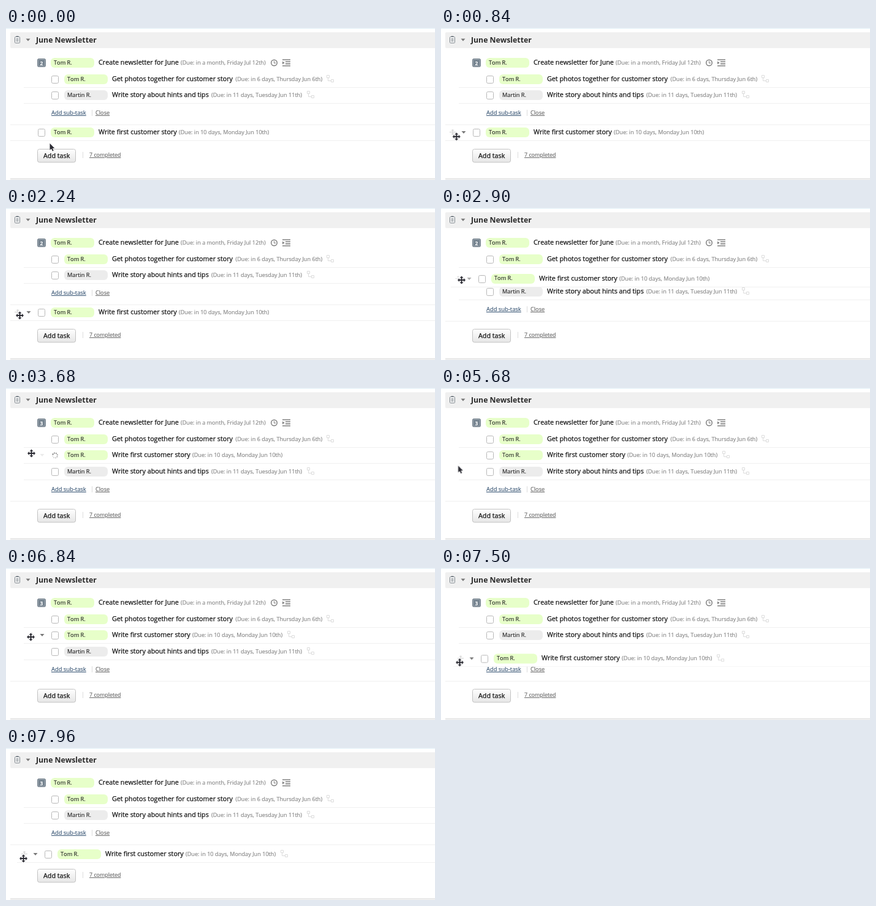
An HTML page for the animation above (8000 ms loop, 700 px wide and 249 px high).

```html
<!DOCTYPE html>
<html lang="en">
<head>
<meta charset="utf-8">
<title>Task list</title>
<style>
html, body { margin: 0; width: 100%; height: 100%; overflow: hidden; background: #fff; }
svg { display: block; width: 700px; height: 249px; font-family: "Open Sans", "Noto Sans", sans-serif; font-kerning: none; }

.title { font-size: 10.75px; fill: #111; stroke: #111; stroke-width: .25px; }
.due { font-size: 9.15px; fill: #8a8a8a; stroke: #8a8a8a; stroke-width: .2px; }
.name { font-size: 9.2px; fill: #222; stroke: #222; stroke-width: .15px; }
.head { font-size: 12.25px; font-weight: 700; fill: #2a2a2a; }
.link { font-size: 9.2px; fill: #666; stroke: #666; stroke-width: .15px; text-decoration: underline; }
.blue { font-size: 9.4px; fill: #3c5876; stroke: #3c5876; }
.count { font-size: 8.5px; font-weight: 700; fill: #fff; text-anchor: middle; }
.line { fill: #f0f0f0; }
.green { fill: #e7ffc9; }
.gray { fill: #ececec; }

/* Everything shares one 8 s clock. */
.anim { animation: 8s linear infinite; }
.step { animation: 8s step-end infinite; }
#cursor { animation-name: cursor; }
#task { animation-name: task; }
#arrow { animation-name: arrow; }
#move { animation-name: move; }
#second { animation-name: second; }
#links { animation-name: links; }
#hover { animation-name: hover; }
#box { animation-name: box; }
#spinner { animation-name: spinner; }
#tree { animation-name: tree; }
#two { animation-name: two; }
#three { animation-name: three; }
#dots { animation: spin .8s steps(12) infinite; }

@keyframes cursor {
  0% { transform: translate(71px, 188px); animation-timing-function: ease-in-out; }
  10.25% { transform: translate(25px, 178px); }
  13.25%, 28% { transform: translate(22px, 176px); animation-timing-function: ease-in; }
  32.25% { transform: translate(27px, 149px); }
  36.25% { transform: translate(33px, 118px); }
  37.75% { transform: translate(35px, 115px); animation-timing-function: ease-out; }
  42.75%, 50.5% { transform: translate(41px, 107px); animation-timing-function: ease-in; }
  56% { transform: translate(34px, 180px); }
  58% { transform: translate(17px, 211px); }
  59.25%, 62.5% { transform: translate(18px, 218px); animation-timing-function: ease-in-out; }
  72.5%, 76.25% { transform: translate(28px, 122px); animation-timing-function: ease-in-out; }
  82%, 83.75% { transform: translate(41px, 114px); }
  85.5%, 88% { transform: translate(40px, 113px); animation-timing-function: ease-in; }
  93% { transform: translate(31px, 147px); animation-timing-function: ease-out; }
  98% { transform: translate(27px, 179px); }
  99.5%, 100% { transform: translate(28px, 181px); }
}
@keyframes task {
  0%, 28% { transform: translate(0, 174px); animation-timing-function: ease-in; }
  32.25% { transform: translate(4px, 149px); }
  36.25% { transform: translate(9px, 119px); }
  37.75% { transform: translate(11px, 116px); animation-timing-function: ease-out; }
  42.75% { transform: translate(17px, 108px); animation-timing-function: step-end; }
  46%, 88% { transform: translate(22px, 113px); animation-timing-function: ease-in; }
  93% { transform: translate(14px, 144px); animation-timing-function: ease-out; }
  98% { transform: translate(10px, 175px); }
  99.5%, 100% { transform: translate(11px, 177px); }
}
@keyframes arrow { 0% { opacity: 1; } 9% { opacity: 0; } 53% { opacity: 1; } 78.5%, 100% { opacity: 0; } }
@keyframes move { 0% { opacity: 0; } 9% { opacity: 1; } 53% { opacity: 0; } 78.5%, 100% { opacity: 1; } }
@keyframes second {
  0% { transform: translate(22px, 113px); }
  34.75% { transform: translate(22px, 140px); }
  91% { transform: translate(22px, 113px); }
}
@keyframes links {
  0% { transform: translateY(0); }
  32.25% { transform: translateY(27px); }
  94.25% { transform: translateY(0); }
}
@keyframes hover {
  0% { opacity: 0; }
  8% { opacity: 1; }
  28.25% { opacity: .6; }
  46% { opacity: .15; }
  53% { opacity: 0; }
  72% { opacity: 1; }
}
@keyframes box { 0% { opacity: 1; } 46% { opacity: 0; } 60.25%, 100% { opacity: 1; } }
@keyframes spinner { 0% { opacity: 0; } 46% { opacity: 1; } 60.25%, 100% { opacity: 0; } }
@keyframes tree { 0% { opacity: 0; } 60.25%, 100% { opacity: 1; } }
@keyframes two { 0% { opacity: 1; } 46%, 100% { opacity: 0; } }
@keyframes three { 0% { opacity: 0; } 46%, 100% { opacity: 1; } }
@keyframes spin { to { transform: rotate(360deg); } }
</style>
</head>
<body>
<svg viewBox="0 0 700 249">
  <defs>
    <linearGradient id="face" x2="0" y2="1">
      <stop stop-color="#fff"/><stop offset="1" stop-color="#e6e6e6"/>
    </linearGradient>
    <!-- Row parts: x of a top-level row, y = 0 on the baseline -->
    <rect id="check" x="52.5" y="-8.5" width="11" height="12" rx="2" fill="#fff" stroke="#b8b8b8"/>
    <rect id="pill" x="73" y="-11" width="71" height="16" rx="6"/>
    <rect id="rule" class="line" x="7" y="10" width="720" height="1"/>
    <path id="caret" d="M-3.5-2h7L0 2z" fill="#777"/>
    <path id="deps" d="M.5.5h4v4h-4zM7.5 7.5h4v4h-4zM2.5 5v4.5h5" fill="none" stroke="#dcdcdc"/>
  </defs>

  <rect width="700" height="1" fill="#e0eff6"/>
  <rect x="7" y="7" width="700" height="26" rx="2" fill="#f0f0f0"/>
  <rect x="7" y="246" width="700" height="9" rx="2" fill="#efefef"/>
  <rect x="7" y="246" width="700" height="1" fill="#e4e4e4"/>

  <g fill="none" stroke="#7b838a">
    <rect x="14.5" y="14.5" width="8" height="10" rx="1" fill="#fafafa"/>
    <path d="M16.500 17.500h4M16.500 19.500h4M16.500 21.500h4"/>
    <path d="M16.500 14h4" stroke-width="2"/>
  </g>
  <use href="#caret" x="36" y="19.5"/>
  <text class="head" x="49" y="24">June Newsletter</text>

  <!-- Parent task -->
  <rect x="51.5" y="50.5" width="13" height="13" rx="2" fill="#75838f" stroke="#6d7a86"/>
  <rect x="52.5" y="51.5" width="11" height="11" rx="1" fill="none" stroke="#a3adb6"/>
  <text class="count step" id="two" x="58" y="60.5">2</text>
  <text class="count step" id="three" x="58" y="60.5">3</text>
  <g transform="translate(0 60)">
    <use href="#pill" class="green"/>
    <text class="name" x="78" y="-.5">Tom R.</text>
    <text class="title" x="151">Create newsletter for June</text>
    <text class="due" x="285">(Due: in a month, Friday Jul 12th)</text>
  </g>
  <g fill="none" stroke="#808080">
    <circle cx="437.5" cy="57" r="4.8" stroke-width="1.5"/>
    <path d="M437.500 54v3.500h2.500"/>
    <path d="M451 52h13M456 55.300h8M456 58.600h8M451 62h13" stroke-width="1.6"/>
    <path d="M451 54.500v5l3.500-2.500z" fill="#808080" stroke="none"/>
  </g>

  <!-- Sub-tasks -->
  <g transform="translate(22 87)">
    <use href="#check"/>
    <use href="#pill" class="green"/>
    <text class="name" x="78" y="-.5">Tom R.</text>
    <text class="title" x="151">Get photos together for customer story</text>
    <text class="due" x="352.5">(Due: in 6 days, Thursday Jun 6th)</text>
    <use href="#deps" x="501" y="-10"/>
    <use href="#rule"/>
  </g>
  <g id="second" class="step">
    <use href="#check"/>
    <use href="#pill" class="gray"/>
    <text class="name" x="78" y="-.5">Martin R.</text>
    <text class="title" x="151">Write story about hints and tips</text>
    <text class="due" x="313">(Due: in 11 days, Tuesday Jun 11th)</text>
    <use href="#deps" x="469" y="-10"/>
    <use href="#rule"/>
  </g>
  <g id="links" class="step">
    <text class="link blue" x="74" y="142">Add sub-task</text>
    <rect x="140" y="134" width="1" height="10" fill="#ddd"/>
    <text class="link" x="146" y="142">Close</text>
    <rect class="line" x="7" y="158" width="700" height="1"/>
  </g>

  <rect x="51.5" y="198.5" width="62" height="21.5" rx="3" fill="url(#face)" stroke="#c2c2c2"/>
  <text class="title" x="61" y="213">Add task</text>
  <rect x="125" y="203" width="1" height="10" fill="#ddd"/>
  <text class="link" x="136" y="211" style="font-size:8.9px">7 completed</text>

  <!-- Dragged task -->
  <g id="task" class="anim">
    <rect x="7" y="-15" width="720" height="25" fill="#fff"/>
    <g id="hover" class="step">
      <use href="#caret" x="37" y="-3"/>
      <path d="M14-3.500h10M17-6.500h4M17-.5h4M19-8v9" fill="none" stroke="#cfcfcf"/>
    </g>
    <use id="box" class="step" href="#check"/>
    <g id="spinner" class="step">
      <g transform="translate(58 -2.5)">
        <g id="dots" fill="#333">
          <circle cx="4" r=".9"/>
          <circle cx="2.8" cy="2.8" r=".9" opacity=".9"/>
          <circle cy="4" r=".9" opacity=".8"/>
          <circle cx="-2.8" cy="2.8" r=".9" opacity=".7"/>
          <circle cx="-4" r=".9" opacity=".55"/>
          <circle cx="-2.8" cy="-2.8" r=".9" opacity=".4"/>
          <circle cy="-4" r=".9" opacity=".3"/>
          <circle cx="2.8" cy="-2.8" r=".9" opacity=".2"/>
        </g>
      </g>
    </g>
    <use href="#pill" class="green"/>
    <text class="name" x="78" y="-.5">Tom R.</text>
    <text class="title" x="151">Write first customer story</text>
    <text class="due" x="282">(Due: in 10 days, Monday Jun 10th)</text>
    <g id="tree" class="step"><use href="#deps" x="437" y="-10"/></g>
    <use href="#rule"/>
  </g>

  <g id="cursor" class="anim" fill="#2b2b33" stroke="#fff" paint-order="stroke">
    <path id="arrow" class="step" stroke-width="1.5" d="M.5 1V12L3 9.700 4.800 13.800 6.700 13 4.900 9H8.200Z"/>
    <path id="move" class="step" stroke-width="2" d="M.5-6.500L3.500-3.500H1.500V-1H4V-3L7 0 4 3V1H1.500V3.500H3.500L.5 6.500-2.500 3.500H-.5V1H-3V3L-6 0-3-3V-1H-.5V-3.500H-2.500Z"/>
  </g>
</svg>
</body>
</html>
```
